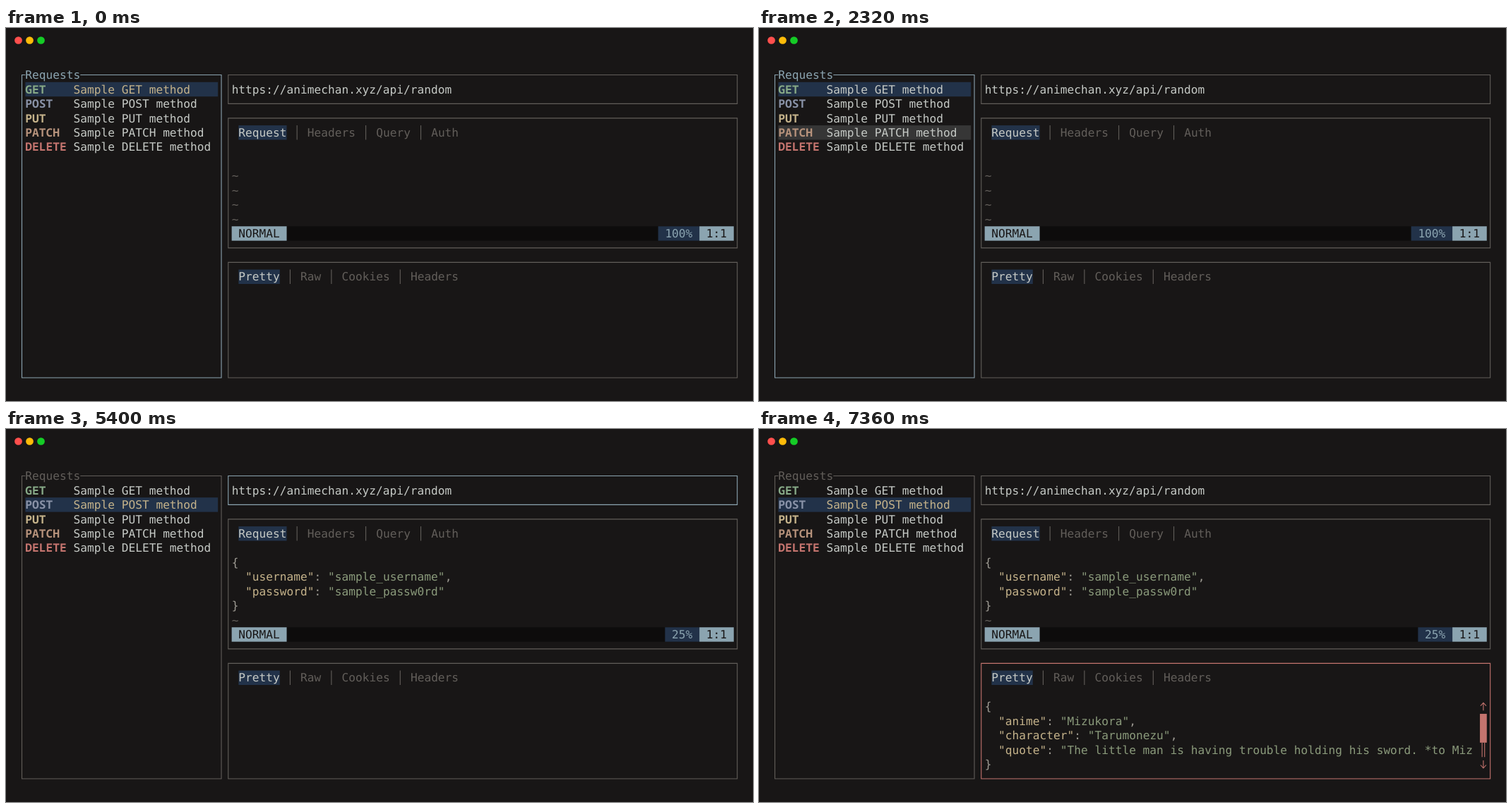
Animation, 1058 px wide and 529 px high, one loop 8 s. Source, as an HTML page:

```html
<!DOCTYPE html>
<html lang="en">
<head>
<meta charset="utf-8">
<title>Terminal API client</title>
<style>
  html, body { margin: 0; width: 100%; height: 100%; overflow: hidden; background: #181616; }
  svg { display: block; width: 100vw; height: 100vh; }
  text {
    font: 16.18px "DejaVu Sans Mono", "Noto Sans Mono", monospace;
    white-space: pre;
    text-rendering: geometricPrecision;
    font-variant-ligatures: none;
  }
  .bold { font: 700 16.23px "Noto Sans Mono", "DejaVu Sans Mono", monospace; }
</style>
</head>
<body>
<svg id="stage" viewBox="0 0 1058 529"></svg>
<script>
const C = {
  bg: '#181616', fg: '#c5c9c5', dim: '#625e5a', blue: '#8ba4b0', navy: '#223249',
  hover: '#363636', black: '#0d0c0c', gold: '#c4b28a', green: '#8a9a7b',
  violet: '#8992a7', orange: '#b6927b', red: '#c4746e', punct: '#9e9b93', get: '#87a987'
};
const LOOP = 8000;

// Terminal grid: cell size and the origin of column 0, row 0
const CW = 9.742, RH = 20.45, X0 = 17.63, Y0 = 56.28;
const x = col => X0 + col * CW;
const y = row => Y0 + row * RH;

const text = (col, row, str, color, cls = '') =>
  `<text class="${cls}" x="${x(col)}" y="${y(row) + 15.9}" fill="${color}">${str}</text>`;
const fill = (col, row, cols, color, rows = 1) =>
  `<rect x="${x(col)}" y="${y(row)}" width="${cols * CW}" height="${rows * RH}" fill="${color}"/>`;
const path = (d, color) =>
  `<path d="${d}" fill="none" stroke="${color}" stroke-width="1.1"/>`;
const vline = (px, row, color) => path(`M${px} ${y(row)}v${RH}`, color);

// Border through the middle of its cells
function frame(c1, r1, c2, r2, color, title = '') {
  const l = x(c1 + .5), t = y(r1 + .5), r = x(c2 + .5), b = y(r2 + .5);
  const gap = title ? `H${x(c1 + 1)}M${x(c1 + 1 + title.length)} ${t}` : '';
  return path(`M${l} ${b}V${t}${gap}H${r}V${b}H${l - .5}`, color)
    + text(c1 + 1, r1, title, color);
}

function tabs(row, names) {
  let col = 32, out = fill(col, row, names[0].length, C.navy);
  names.forEach((name, i) => {
    if (i) {
      out += vline(x(col + 1.5), row, C.dim);
      col += 3;
    }
    out += text(col, row, name, i ? C.dim : C.fg);
    col += name.length;
  });
  return out;
}

function json(row, pairs) {
  let out = text(31, row, '{', C.punct);
  for (const [key, value, tail] of pairs) {
    const end = 37 + key.length + value.length;
    out += text(33, ++row, `"${key}"`, C.gold)
      + text(35 + key.length, row, ':', C.punct)
      + text(37 + key.length, row, value, C.green)
      + text(end, row, tail, C.punct);
  }
  return out + text(31, row + 1, '}', C.punct);
}

const METHODS = [
  ['GET', C.get], ['POST', C.violet], ['PUT', C.gold], ['PATCH', C.orange], ['DELETE', C.red]
];

function requestList({ hover, sel, focus }) {
  let out = frame(0, 0, 29, 21, focus === 'list' ? C.blue : C.dim, 'Requests');
  METHODS.forEach(([name, color], i) => {
    if (i === sel) out += fill(1, i + 1, 28, C.navy);
    else if (i === hover) out += fill(1, i + 1, 28, C.hover);
    out += text(1, i + 1, name, color, 'bold')
      + text(8, i + 1, `Sample ${name} method`, i === sel && i === hover ? C.gold : C.fg);
  });
  return out;
}

function editor({ sel, focus }) {
  const percent = sel ? ' 25% ' : ' 100% ';
  const start = 99 - percent.length;
  let out = frame(30, 3, 104, 12, focus === 'request' ? C.blue : C.dim)
    + tabs(4, ['Request', 'Headers', 'Query', 'Auth']);
  if (sel) {
    out += json(6, [
      ['username', '"sample_username"', ','],
      ['password', '"sample_passw0rd"', '']
    ]);
  }
  for (let row = sel ? 10 : 7; row <= 10; row++) out += text(31, row, '~', C.dim);
  return out
    + fill(31, 11, 73, C.black)
    + fill(31, 11, 8, C.blue) + text(32, 11, 'NORMAL', C.bg)
    + fill(start, 11, percent.length, C.navy) + text(start + 1, 11, percent.trim(), C.blue)
    + fill(99, 11, 5, C.blue) + text(100, 11, '1:1', C.bg);
}

function scrollbar() {
  const mid = x(103.5);
  const arrow = (row, dir) => {
    const tip = y(row + .5) - dir * 5.5;
    return path(`M${mid} ${tip}v${dir * 11}M${mid - 4} ${tip + dir * 4.5}L${mid} ${tip}l4 ${dir * 4.5}`, C.red);
  };
  return arrow(16, 1) + fill(103, 17, 1, C.red, 2)
    + vline(mid - 1.8, 19, C.red) + vline(mid + 1.8, 19, C.red) + arrow(20, -1);
}

function response({ focus, active, body }) {
  const border = active ? C.red : focus === 'response' ? C.blue : C.dim;
  let out = frame(30, 13, 104, 21, border) + tabs(14, ['Pretty', 'Raw', 'Cookies', 'Headers']);
  if (body) {
    out += json(16, [
      ['anime', '"Mizukora"', ','],
      ['character', '"Tarumonezu"', ','],
      ['quote', '"The little man is having trouble holding his sword. *to Miz', '']
    ]) + scrollbar();
  }
  return out;
}

const buttons = ['#ff4f4d', '#febb09', '#15cc26']
  .map((color, i) => `<circle cx="${17.5 + 16 * i}" cy="17.5" r="5.33" fill="${color}"/>`).join('');

// Each step changes only the listed values
const STEPS = [
  [0, { hover: 0, sel: 0, focus: 'list', active: false, body: false }],
  [920, { hover: 1 }],
  [1840, { hover: 2 }],
  [2320, { hover: 3 }],
  [3600, { hover: 2 }],
  [4040, { hover: 1 }],
  [4480, { sel: 1 }],
  [5400, { focus: 'url' }],
  [6320, { focus: 'request' }],
  [6800, { focus: 'response' }],
  [7320, { active: true }],
  [7360, { body: true }]
];

const stage = document.getElementById('stage');
const origin = performance.now();
let shown = 0;

function tick() {
  const t = (performance.now() - origin) % LOOP;
  const past = STEPS.filter(([at]) => at <= t);
  if (past.length !== shown) {
    shown = past.length;
    const state = Object.assign({}, ...past.map(([, change]) => change));
    stage.innerHTML = buttons + requestList(state)
      + frame(30, 0, 104, 2, state.focus === 'url' ? C.blue : C.dim)
      + text(31, 1, 'https://animechan.xyz/api/random', C.fg)
      + editor(state) + response(state);
  }
  requestAnimationFrame(tick);
}
tick();
</script>
</body>
</html>
```
